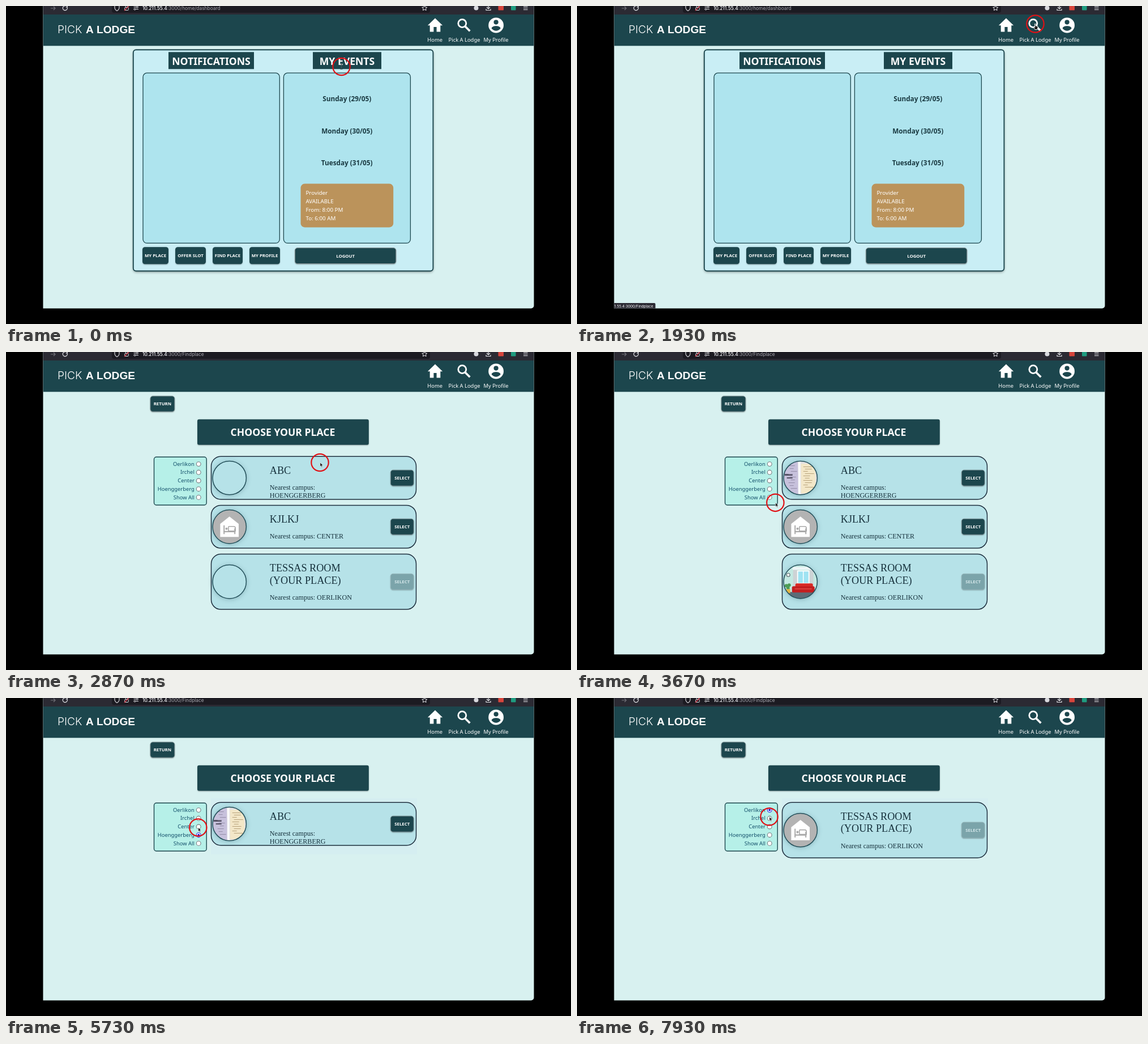
Write an HTML page with a canvas that moves like this. It is 998x561 px and loops after 8 s.

```html
<!DOCTYPE html>
<html lang="en">
<head>
<meta charset="utf-8">
<title>Pick A Lodge</title>
<style>
  html, body { margin: 0; width: 100%; height: 100%; overflow: hidden; background: #000; }
  canvas { display: block; width: 998px; height: 561px; }
</style>
</head>
<body>
<canvas id="stage" width="998" height="561"></canvas>
<script>
const ctx = document.getElementById('stage').getContext('2d');
const LOOP = 8000, FRAME = 1000 / 15;
const SANS = '"Noto Sans", sans-serif';
const UI = 'Inter, sans-serif';
const SERIF = '"Liberation Serif", serif';
const TEAL = '#1c464d', PAGE = '#d8f1f0', INK = '#1a3a42', ICON = '#e8e8ec';

// Pointer keys: frame, x, y
const PATH = [
  [0, 592.5, 107], [3, 592.5, 107], [6, 822, 111], [10, 822, 111],
  [14, 812.5, 42.5], [19, 809.5, 31.5], [39, 809.5, 31.5], [43, 554.5, 195],
  [46, 554.5, 195], [49, 405, 273], [51, 405, 273], [56, 344, 265],
  [57, 344, 265], [67, 337.7, 242.3], [79, 337.7, 242.3], [82, 337.5, 251],
  [86, 339.3, 228.5], [97, 339.3, 228.5], [100, 339, 251], [105, 338.5, 197],
  [115, 338.5, 197], [117, 340, 221], [119, 339.5, 209.5], [120, 339.5, 209.5]
];

const PLACES = {
  abc: { title: ['ABC'], campus: ['Nearest campus:', 'HOENGGERBERG'], photo: tickets },
  kjl: { title: ['KJLKJ'], campus: ['Nearest campus: CENTER'] },
  own: { title: ['TESSAS ROOM', '(YOUR PLACE)'], campus: ['Nearest campus: OERLIKON'], photo: lounge, off: true }
};

function box(x, y, w, h, r, fill, stroke, lw = 1) {
  ctx.beginPath();
  ctx.roundRect(x, y, w, h, r);
  paint(fill, stroke, lw);
}

function disc(x, y, r, fill, stroke, lw = 1) {
  ctx.beginPath();
  ctx.arc(x, y, r, 0, 7);
  paint(fill, stroke, lw);
}

function poly(points, fill, stroke, lw = 1) {
  ctx.beginPath();
  for (let i = 0; i < points.length; i += 2) ctx.lineTo(points[i], points[i + 1]);
  paint(fill, stroke, lw);
}

function paint(fill, stroke, lw) {
  if (fill) { ctx.fillStyle = fill; ctx.fill(); }
  if (stroke) {
    ctx.shadowColor = 'transparent';
    ctx.strokeStyle = stroke;
    ctx.lineWidth = lw;
    ctx.stroke();
  }
}

function shadowed(blur, dy, color, draw) {
  ctx.save();
  ctx.shadowBlur = blur;
  ctx.shadowOffsetY = dy;
  ctx.shadowColor = color;
  draw();
  ctx.restore();
}

// y is the middle of the capitals
function label(str, x, y, size, color, align = 'center', weight = 400, family = SANS) {
  ctx.font = `${weight} ${size}px ${family}`;
  ctx.textAlign = align;
  ctx.fillStyle = color;
  ctx.fillText(str, x, y + size * 0.36);
  return ctx.measureText(str).width;
}

function button(str, x, y, w, h, edge, off) {
  shadowed(2, 1, 'rgba(0,0,0,.35)', () =>
    box(x, y, w, h, 4.5, off ? '#7ba4aa' : TEAL, edge, 1));
  label(str, x + w / 2, y + h / 2, 7.8, off ? '#d3e7ea' : '#fff', 'center', 700);
}

function browserBar(path) {
  ctx.fillStyle = '#2b2a33';
  ctx.fillRect(65.5, 0, 867, 15);
  box(187, -8, 562, 20, 4, '#1c1b22');
  poly([79, 4, 87, 4], null, '#75747c', 1.1);
  poly([84, 1, 87, 4, 84, 7], null, '#75747c', 1.1);
  ctx.beginPath();
  ctx.arc(104.3, 3.7, 4, -0.3, 5);
  paint(null, ICON, 1.2);
  poly([108.8, -1, 108.8, 2.4, 105.5, 2.4], ICON);
  ctx.beginPath();
  ctx.moveTo(192, -1);
  ctx.lineTo(192, 3);
  ctx.quadraticCurveTo(192.5, 7, 196, 8.4);
  ctx.quadraticCurveTo(199.5, 7, 200, 3);
  ctx.lineTo(200, -1);
  paint(null, ICON, 1.1);
  box(209.7, 2.5, 6.6, 5, 1, null, '#d9d9de', 1);
  box(211, -2, 4, 4.5, 2, null, '#d9d9de', 1);
  poly([209, 8, 217, 0], null, '#e0394a', 1.2);
  for (const [y, x] of [[1.8, 231.5], [5.6, 227.5]]) {
    poly([225.5, y, 234, y], null, ICON, 1);
    disc(x, y, 1.4, '#1c1b22', ICON, 1);
  }
  const host = label('10.211.55.4', 241, 3.7, 8.4, '#fbfbfe', 'left', 500, UI);
  label(path, 241 + host, 3.7, 8.4, '#a9a8b0', 'left', 400, UI);

  const star = [];
  for (let i = 0; i <= 10; i++) {
    const a = i * Math.PI / 5 - Math.PI / 2, r = i % 2 ? 2.3 : 4.8;
    star.push(739.3 + r * Math.cos(a), 3.8 + r * Math.sin(a));
  }
  poly(star, null, ICON, 1);
  disc(830.5, 3.5, 4, '#d9d9de');
  poly([852, -1, 852, 4.5], null, ICON, 1.2);
  poly([849, 2, 852, 5, 855, 2], null, ICON, 1.2);
  poly([848, 5, 848, 7.5, 856, 7.5, 856, 5], null, ICON, 1.1);
  box(869.5, -1, 9.5, 8.6, 1, '#d8453c');
  box(892, -1, 8.5, 8.6, 1, '#1f9c80');
  for (let y = 0.5; y < 8; y += 3) poly([914, y, 921.5, y], null, ICON, 1);
}

function navBar() {
  ctx.fillStyle = TEAL;
  ctx.fillRect(65.5, 15, 867, 55.3);
  label('PICK', 91, 41.2, 19.2, '#fff', 'left', 300, UI);
  label('A LODGE', 141, 41.2, 19.1, '#fff', 'left', 700, '"Liberation Sans", sans-serif');

  poly([758, 21.5, 771.2, 34.3, 767.3, 34.3, 767.3, 45.5, 760.6, 45.5, 760.6, 37,
    755.4, 37, 755.4, 45.5, 748.7, 45.5, 748.7, 34.3, 744.8, 34.3], '#fff');
  disc(805.8, 30.6, 7, null, '#fff', 2.8);
  poly([810.6, 35.4, 819.4, 44.2], null, '#fff', 3.6);
  disc(865.6, 34, 13.4, '#fff');
  disc(865.6, 28.6, 4.1, TEAL);
  ctx.beginPath();
  ctx.moveTo(857.6, 39.4);
  ctx.bezierCurveTo(858.5, 33.8, 872.7, 33.8, 873.6, 39.4);
  ctx.quadraticCurveTo(865.6, 48, 857.6, 39.4);
  paint(TEAL);

  label('Home', 757.7, 59.6, 9.4, '#fff');
  label('Pick A Lodge', 809.5, 59.6, 9.4, '#fff');
  label('My Profile', 865.5, 59.6, 9.4, '#fff');
}

function dashboard() {
  shadowed(4, 2, 'rgba(0,0,0,.4)', () =>
    box(224.8, 77.3, 529.6, 390.2, 5, '#c9eef5', TEAL, 1.9));
  const heads = [['NOTIFICATIONS', 287, 151], ['MY EVENTS', 542, 121]];
  for (const [str, x, w] of heads) {
    box(x, 81.3, w, 30, 0, TEAL);
    label(str, x + w / 2, 97.8, 17.6, '#fff', 'center', 700);
  }
  box(242, 118.2, 241.3, 300.2, 7, '#aee4ee', TEAL, 1.3);
  box(490.4, 118.2, 224, 300.2, 7, '#aee4ee', TEAL, 1.3);
  ['Sunday (29/05)', 'Monday (30/05)', 'Tuesday (31/05)'].forEach((day, i) =>
    label(day, 602.2, 163.8 + i * 56.7, 11.75, INK, 'center', 700));
  box(520.5, 313.6, 163.7, 76.8, 7, '#bb935b');
  ['Provider', 'AVAILABLE', 'From: 8:00 PM', 'To: 6:00 AM'].forEach((line, i) =>
    label(line, 529.4, 329.9 + i * 14.8, 9.8, '#fff', 'left'));
  button('MY PLACE', 241, 425.3, 46, 30);
  button('OFFER SLOT', 299, 425.3, 54, 30);
  button('FIND PLACE', 365, 425.3, 53, 30);
  button('MY PROFILE', 430, 425.3, 54, 30);
  button('LOGOUT', 510.3, 426.7, 178.6, 28, '#8f9a9c');
}

function filters(picked) {
  box(261.5, 185.3, 92.7, 84.7, 4, '#b6f0e8', TEAL, 1.4);
  ['Oerlikon', 'Irchel', 'Center', 'Hoenggerberg', 'Show All'].forEach((name, i) => {
    const y = 197.6 + i * 14.7, on = name === picked;
    label(name, 332.8, y - 0.2, 9.4, '#14506b', 'right');
    disc(340.2, y, 3.9, '#fff', on ? '#2222dd' : '#777d80', 1.1);
    if (on) disc(340.2, y, 2, '#2222dd');
  });
}

function houseIcon(x, y) {
  ctx.fillStyle = '#b3b3b3';
  ctx.fillRect(x - 32, y - 32, 64, 64);
  poly([x, y - 18, x + 16.3, y - 5, x + 16.3, y + 18, x - 16.3, y + 18, x - 16.3, y - 5], '#fff');
  ctx.fillStyle = '#aaa';
  ctx.fillRect(x - 10.5, y - 2.5, 2, 15.5);
  ctx.fillRect(x - 10.5, y + 7.5, 21, 2.2);
  ctx.fillRect(x + 8.5, y + 3, 2, 10);
  disc(x - 5.2, y + 3.5, 2.1, '#aaa');
  box(x - 1.8, y - 0.5, 12.3, 8, [1, 3, 0, 0], null, '#aaa', 1.6);
}

function tickets(x, y) {
  ctx.fillStyle = '#e4e2e3';
  ctx.fillRect(x - 32, y - 32, 64, 64);
  poly([x - 32, y - 26, x - 5, y - 32, x - 2, y + 32, x - 32, y + 32], '#c7c1dc');
  poly([x + 1, y - 25, x + 26, y - 25, x + 27, y + 26, x + 1, y + 27], '#f3e7c8');
  ctx.fillStyle = '#fafafa';
  ctx.fillRect(x - 4, y - 30, 4, 60);
  ctx.fillStyle = '#514d60';
  ctx.fillRect(x - 28, y - 7, 14, 3);
  ctx.fillRect(x - 24, y - 1, 10, 2);
  ctx.fillStyle = '#918aa5';
  for (let i = 0; i < 9; i++) ctx.fillRect(x - 21 + i % 3 * 2, y - 22 + i * 5, 11 - i % 2 * 4, 1);
  ctx.fillStyle = '#b09b72';
  for (let i = 0; i < 10; i++) ctx.fillRect(x + 5 + i % 2 * 3, y - 20 + i * 4, 16 - i % 3 * 4, 0.9);
}

function lounge(x, y) {
  ctx.fillStyle = '#c3e9e2';
  ctx.fillRect(x - 32, y - 32, 64, 64);
  ctx.fillStyle = '#5c6c77';
  ctx.fillRect(x - 32, y + 18, 64, 14);
  ctx.fillStyle = '#cdd3d5';
  ctx.fillRect(x - 13, y - 24, 8, 34);
  ctx.fillRect(x + 15, y - 24, 8, 34);
  ctx.fillStyle = '#eef6f7';
  ctx.fillRect(x - 14, y - 26, 38, 5);
  box(x - 5, y - 19, 20, 22, 0, '#9fe3f2', '#fff', 1.8);
  poly([x + 5, y - 19, x + 5, y + 3], null, '#fff', 1.4);
  disc(x - 21.5, y - 12, 3, '#edf5f2', '#55646a', 1.1);
  box(x - 9, y + 3, 31, 11, 2.5, '#d92a25');
  box(x - 15, y + 8, 40, 11, 2.5, '#c31f20');
  poly([x - 10, y + 12.5, x + 20, y + 12.5], null, '#ec554c', 1.2);
  for (const [dx, dy] of [[-25, 7], [-20, 6], [-22, 11]]) disc(x + dx, y + dy, 3, '#4c9c55');
  ctx.fillStyle = '#e3b744';
  ctx.fillRect(x - 25, y + 13, 7, 7);
}

function card(place, y, photos) {
  const tall = place.title.length > 1, h = tall ? 97.6 : 75.7, mid = y + h / 2;
  box(362.5, y, 362, h, 17, '#b6e2e8', '#1e2f3e', 1.5);
  shadowed(8, 1, 'rgba(40,80,95,.35)', () => disc(394.7, mid, 29.7, '#b6e2e8'));
  const art = place.photo && photos !== 'none' ? photos === 'blank' ? null : place.photo : houseIcon;
  if (art) {
    ctx.save();
    ctx.beginPath();
    ctx.arc(394.7, mid, 29.7, 0, 7);
    ctx.clip();
    art(394.7, mid);
    ctx.restore();
  }
  disc(394.7, mid, 29.7, null, '#24505a', 1.5);

  ctx.textAlign = 'left';
  ctx.fillStyle = '#17323d';
  ctx.font = `18.2px ${SERIF}`;
  place.title.forEach((line, i) => ctx.fillText(line, 465.8, y + 30.2 + i * 21.8));
  ctx.font = `12.1px ${SERIF}`;
  place.campus.forEach((line, i) => ctx.fillText(line, 465.8, y + (tall ? 80.2 : 58.3) + i * 14.2));
  button('SELECT', 679.3, mid - 14, 40.8, 28, place.off ? '#95b5b9' : '#7d9297', place.off);
}

function finder(f) {
  button('RETURN', 254.9, 77.8, 43, 27.4, '#87999c');
  shadowed(2, 1, 'rgba(0,0,0,.3)', () => box(338, 118.8, 302.8, 45, 3, TEAL));
  label('CHOOSE YOUR PLACE', 489, 141.5, 17.6, '#fff', 'center', 700);
  filters(f < 74 ? '' : f < 91 ? 'Hoenggerberg' : f < 111 ? 'Center' : 'Oerlikon');

  if (f < 33 || f >= 74) box(362, 177, 364, 99, 0, '#d5eef1');
  if (f < 33) {
    box(431.5, 183.2, 224.5, 2.9, 1.4, '#1e2532');
  } else if (f < 74) {
    const photos = f < 41 ? 'none' : f < 52 ? 'blank' : 'all';
    card(PLACES.abc, 184.3, photos);
    card(PLACES.kjl, 270.4, photos);
    card(PLACES.own, 356.5, photos);
  } else if (f < 91) {
    card(PLACES.abc, 184.3, 'all');
  } else if (f < 111) {
    card(PLACES.kjl, 184.3, 'all');
  } else {
    card(PLACES.own, 184.3, 'none');
  }
}

function pointerAt(f) {
  let i = 0;
  while (i < PATH.length - 2 && f >= PATH[i + 1][0]) i++;
  const [fa, xa, ya] = PATH[i], [fb, xb, yb] = PATH[i + 1];
  const k = (f - fa) / (fb - fa), e = k * k * (3 - 2 * k);
  return [xa + (xb - xa) * e, ya + (yb - ya) * e];
}

function pointer(f) {
  const [x, y] = pointerAt(f);
  ctx.save();
  ctx.translate(x, y);
  ctx.lineJoin = 'round';
  if (f < 4) {
    poly([0, -4, 0, 4], null, '#4b5558', 1);
    poly([-2, -4.5, 2, -4.5], null, '#4b5558', 1);
    poly([-2, 4.5, 2, 4.5], null, '#4b5558', 1);
  } else if (f >= 13 && f < 41) {
    poly([-1, 0, 0.4, 0, 0.7, 3.5, 4.5, 4.4, 4.5, 7, 3.4, 10, -0.5, 10, -3, 6.2, -2, 5.5, -0.8, 6.4, -1, 0],
      '#111', '#fff', 0.9);
  } else {
    poly([0.4, 0, 0.4, 7.2, 2, 5.7, 3.2, 8.5, 4.4, 8, 3.2, 5.3, 5.4, 5.1, 0.4, 0], '#111', '#fff', 0.6);
  }
  disc(0, 0, 15.2, null, '#e01015', 2.2);
  ctx.restore();
}

function draw(f) {
  ctx.fillStyle = '#000';
  ctx.fillRect(0, 0, 998, 561);
  ctx.save();
  ctx.beginPath();
  ctx.roundRect(65.5, -10, 867, 543.4, [0, 0, 5, 0]);
  ctx.clip();
  ctx.fillStyle = PAGE;
  ctx.fillRect(65, 0, 868, 534);
  browserBar(f < 33 ? ':3000/home/dashboard' : ':3000/Findplace');
  navBar();
  if (f < 32) dashboard();
  else finder(f);
  if (f >= 16 && f < 33) {
    box(62, 524, 76.5, 12, [0, 2, 0, 0], '#2b2a33');
    label('1.55.4:3000/Findplace', 66, 529.2, 6.5, '#fbfbfe', 'left', 400, UI);
  }
  ctx.restore();
  pointer(f);
}

function tick(now) {
  draw(Math.floor((now % LOOP + 4) / FRAME) % 120);
  requestAnimationFrame(tick);
}
requestAnimationFrame(tick);
</script>
</body>
</html>
```
